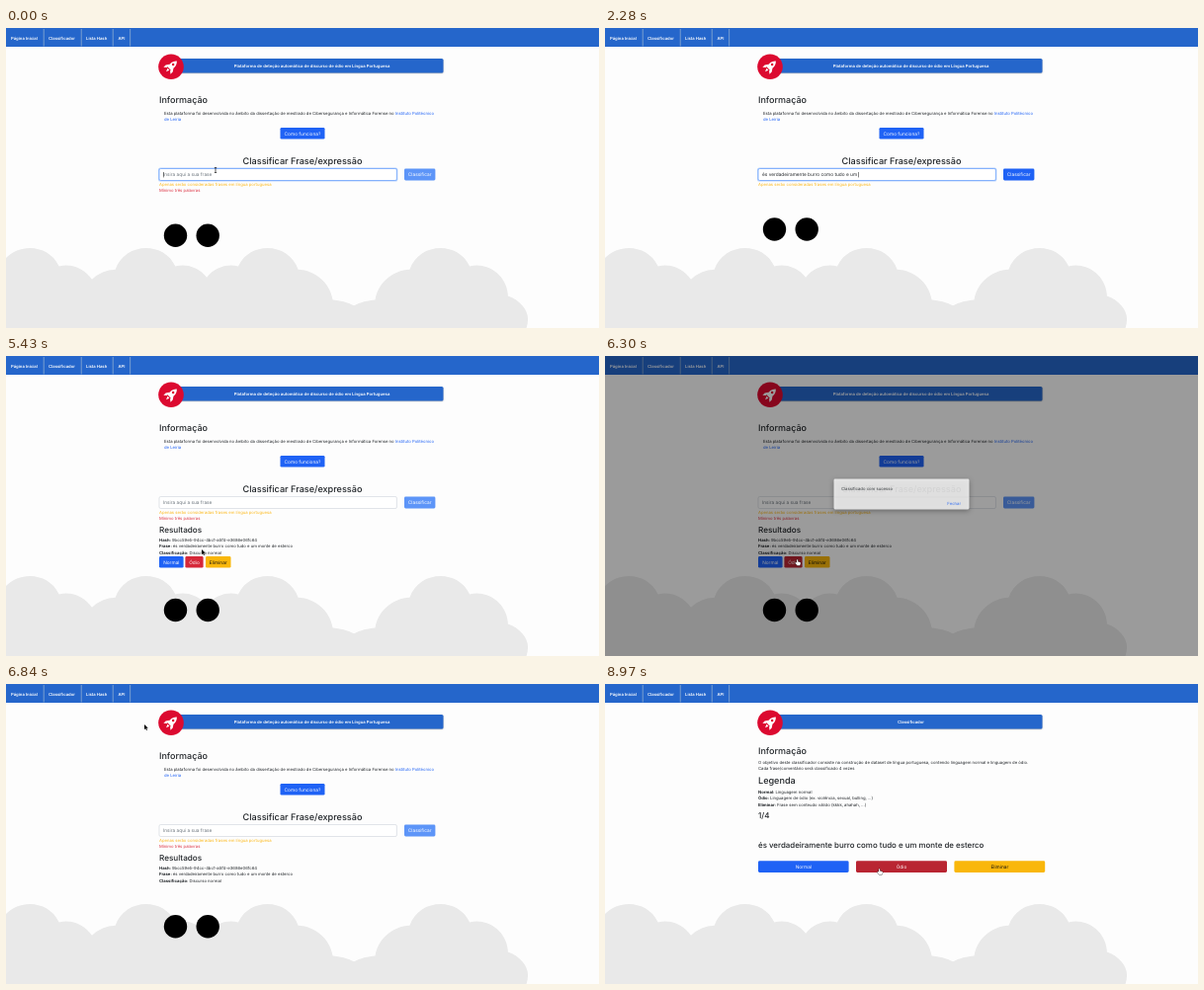
These frames come from a looping animation (600 px wide and 304 px high, 9 s). An HTML page with a canvas:

```html
<!DOCTYPE html>
<html lang="pt">
<head>
<meta charset="utf-8">
<style>
html, body { margin: 0; width: 100%; height: 100%; overflow: hidden; background: #fdfdfd; }
canvas { display: block; width: 600px; height: 304px; }
</style>
</head>
<body>
<canvas id="stage"></canvas>
<script>
const W = 600, H = 304, LOOP = 9000;
const canvas = document.getElementById('stage');
const ctx = canvas.getContext('2d');
const dpr = window.devicePixelRatio || 1;
canvas.width = W * dpr;
canvas.height = H * dpr;

const INK = '#212529', BLUE = '#1f62f5', BAR = '#2566cb', RED = '#d62839',
  DARK_RED = '#b92532', YELLOW = '#f9b70b', PALE_BLUE = '#5d95f8';
const HEAD = 9.1, SUBHEAD = 8, BODY = 4.77, SMALL = 4.23;
const PHRASE = 'és verdadeiramente burro como tudo e um monte de esterco';

// Moments of the story, in ms
const T = {
  type: 210, pointer: 3000, send: 3330, result: 4890, press: 6215,
  close: 6600, cleared: 6690, page: 7680, loaded: 8370
};

const TYPING = [[210, 1], [1100, 20], [2270, 40], [2920, PHRASE.length]];
const POINTER = [
  [0, 212, 144], [3020, 212, 144], [3180, 450, 152], [3260, 432, 150],
  [4960, 432, 150], [5430, 198, 196], [5720, 195, 209], [6380, 195, 209],
  [6540, 353, 149], [6640, 353, 149], [6840, 140, 41], [7250, 56, 12],
  [8190, 54, 11], [8400, 54, 11], [8780, 296, 203], [8930, 278, 190], [9000, 278, 190]
];
const HAND_TIMES = [[3220, 4990], [5650, 6400], [6510, 6660], [7180, 8440], [8850, 9000]];

const clamp = v => Math.max(0, Math.min(1, v));
const smooth = u => u * u * (3 - 2 * u);

function along(keys, t, ease = u => u) {
  let i = 1;
  while (i < keys.length - 1 && keys[i][0] <= t) i++;
  const [a, b] = [keys[i - 1], keys[i]];
  const u = ease(clamp((t - a[0]) / (b[0] - a[0])));
  return a.slice(1).map((v, k) => v + (b[k + 1] - v) * u);
}

function setFont(size, weight) {
  ctx.font = `${weight} ${size}px Inter, sans-serif`;
}

function text(str, x, y, { size = SMALL, weight = 400, color = INK, align = 'left' } = {}) {
  setFont(size, weight);
  ctx.fillStyle = color;
  ctx.textAlign = align;
  ctx.fillText(str, x, y);
  return ctx.measureText(str).width;
}

function labelled(label, str, x, y) {
  const w = text(label + ' ', x, y, { weight: 700 });
  text(str, x + w, y);
}

function box(x, y, w, h, r, fill) {
  ctx.beginPath();
  ctx.roundRect(x, y, w, h, r);
  ctx.fillStyle = fill;
  ctx.fill();
}

function disc(x, y, r, fill) {
  ctx.beginPath();
  ctx.arc(x, y, r, 0, Math.PI * 2);
  ctx.fillStyle = fill;
  ctx.fill();
}

function button(label, x, y, w, h, fill, color = '#fff') {
  box(x, y, w, h, 1.4, fill);
  text(label, x + w / 2, y + h / 2 + 1.75, { size: BODY, color, align: 'center' });
}

const cloudPath = new Path2D(
  'M2379.7 229c10-93-77-171-168-149-52-114-225-105-264 15-75 3-140 59-152 133' +
  '-30 3-67 10-93.5 26-27-16-63.5-23-93.5-26-12-74-77-130-152-133-39-120-212-129-264-15' +
  '-54-13-107 9-138.5 49-32-40-84-62-138.5-49-52-114-225-105-264 15' +
  'a162 162 0 0 0-103 43c-31-45-87-72-145-58-52-114-225-105-264 15-75 3-140 59-152 133' +
  '-53 5-127 23-130 83-2 42 35 72 70 86H2435c20-20 32-50 33-80 3-43-34-87-88-106z');

function clouds() {
  ctx.save();
  ctx.translate(-71.9, 223);
  ctx.scale(0.2298, 0.2298);
  ctx.translate(142.7, 0);
  ctx.fillStyle = '#e9e9e9';
  ctx.fill(cloudPath);
  ctx.restore();
}

function rocket(x, y) {
  ctx.save();
  ctx.translate(x, y);
  ctx.rotate(Math.PI / 4);
  ctx.fillStyle = '#fff';
  ctx.fill(new Path2D('M0-8.2C3-5.6 3.4-2 2.4 2.6H-2.4C-3.4-2-3-5.6 0-8.2z' +
    'M2.9-.6L5 2.6V5.8L2.3 3.6zM-2.9-.6L-5 2.6V5.8L-2.3 3.6zM-1.3 3.6H1.3L0 7z'));
  ctx.restore();
  disc(x + 2.1, y - 2.1, 1.25, '#dc0a30');
}

function frame(title) {
  ctx.fillStyle = '#fdfdfd';
  ctx.fillRect(0, 0, W, H);
  clouds();
  ctx.fillStyle = BAR;
  ctx.fillRect(0, 0, W, 19);
  const links = [['Página Inicial', 5], ['Classificador', 43], ['Lista Hash', 81], ['API', 113.5]];
  for (const [name, x] of links) text(name, x, 11.5, { weight: 600, color: '#fff' });
  ctx.fillStyle = 'rgba(235,235,215,.6)';
  for (const x of [37.8, 75.8, 107.8, 125.4]) ctx.fillRect(x, 1, 0.7, 17.5);

  ctx.save();
  ctx.shadowColor = 'rgba(0,0,0,.3)';
  ctx.shadowBlur = 1.5 * dpr;
  ctx.shadowOffsetY = 0.4 * dpr;
  box(167, 31, 275.5, 14.6, 1.6, BAR);
  ctx.restore();
  disc(167, 39.2, 12.8, '#dc0a30');
  rocket(167, 39.2);
  text(title, 309.5, 39.9, { weight: 600, color: '#fff', align: 'center' });
}

function inputField(t, typed, focused) {
  if (focused) box(154, 141.4, 242.4, 14.2, 2.2, '#b9d3fd');
  box(155, 142.5, 240.4, 12, 1.5, '#fff');
  ctx.lineWidth = focused ? 0.8 : 0.5;
  ctx.strokeStyle = focused ? '#6ea4fb' : '#c3c9d2';
  ctx.stroke();
  const empty = !typed;
  const w = text(empty ? 'Insira aqui a sua frase' : typed, 159, 150.3,
    { size: BODY, color: empty ? '#6c757d' : INK });
  if (focused) {
    ctx.fillStyle = '#111';
    ctx.fillRect(159 + (empty ? 0 : w), 146, 0.5, 5.4);
  }
}

function spinner(t) {
  const start = Math.PI * 0.85 + (t - 3540) / 750 * Math.PI * 2;
  ctx.beginPath();
  ctx.arc(408, 148, 4.5, start, start + Math.PI * 1.5);
  ctx.lineWidth = 1.25;
  ctx.strokeStyle = INK;
  ctx.stroke();
}

function results(t) {
  text('Resultados', 155, 178.6, { size: 8.15, weight: 500 });
  labelled('Hash:', '9bcc59e5-94cc-4bc1-a5f4-e3686e06fc64', 155, 187.7);
  labelled('Frase:', PHRASE, 155, 194.2);
  labelled('Classificação:', 'Discurso normal', 155, 200.7);
  if (t >= T.cleared) return;
  const hover = t > 5650 && t < 6400;
  button('Normal', 155, 203, 24.6, 11.6, BLUE);
  button('Ódio', 181.4, 203, 18.2, 11.6, hover ? DARK_RED : RED);
  button('Eliminar', 202, 203, 25.5, 11.6, YELLOW, '#111');
}

function homePage(t) {
  const waiting = t >= T.send && t < T.result;
  const done = t >= T.result;
  const count = t < T.type || done ? 0 : Math.floor(along(TYPING, t)[0]);
  const tooShort = count < 20;

  frame('Plataforma de deteção automática de discurso de ódio em Língua Portuguesa');
  text('Informação', 155, 75.9, { size: 9, weight: 500 });
  const w = text('Esta plataforma foi desenvolvida no âmbito da dissertação de mestrado de ' +
    'Cibersegurança e Informática Forense no ', 160, 88);
  text('Instituto Politécnico', 160 + w, 88, { color: BLUE });
  text('de Leiria', 160, 94.4, { color: BLUE });
  button('Como funciona?', 277.5, 100.9, 45, 11.7, BLUE);

  text('Classificar Frase/expressão', 300, 137.9, { size: HEAD, weight: 500, align: 'center' });
  inputField(t, PHRASE.slice(0, count), t < T.send);
  if (waiting) spinner(t);
  else button('Classificar', 403, 142.6, 31.4, 11.8, tooShort ? PALE_BLUE : BLUE);

  text('Apenas serão consideradas frases em língua portuguesa', 155, 159.6, { color: '#fcb91c' });
  if (waiting) text('Aguarde, pode demorar até 5 segundos para obter a sua classificação.', 155, 166);
  else if (tooShort) text('Mínimo três palavras', 155, 166, { color: '#dc3545' });
  if (done) results(t);

  let iconY = tooShort || waiting ? 210.3 : 204;
  if (done) iconY = t < T.cleared ? 257.5 : 245.8;
  for (const x of [171.5, 204.2]) disc(x, iconY, 11.7, '#000');
}

function classifierPage(t) {
  frame('Classificador');
  text('Informação', 155, 71.1, { size: 9, weight: 500 });
  text('O objetivo deste classificador consiste na construção de dataset de língua portuguesa, ' +
    'contendo linguagem normal e linguagem de ódio.', 155, 80.8);
  text('Cada frase/comentário será classificado 4 vezes', 155, 87.2);
  text('Legenda', 155, 101.1, { size: HEAD, weight: 500 });
  labelled('Normal:', 'Linguagem normal', 155, 110.7);
  labelled('Ódio:', 'Linguagem de ódio (ex. violência, sexual, bulling, ...)', 155, 117.1);
  labelled('Eliminar:', 'Frase sem conteudo válido (kkkk, ahahah, ...)', 155, 123.6);
  if (t < T.loaded) return;
  text('1/4', 155, 136.4, { size: SUBHEAD, weight: 500 });
  text(PHRASE, 155, 166.3, { size: 7.9, weight: 500 });
  button('Normal', 155, 179.3, 91.6, 11.7, BLUE);
  button('Ódio', 254, 179.3, 92, 11.7, t > 8750 ? DARK_RED : RED);
  button('Eliminar', 353.4, 179.3, 91.8, 11.7, YELLOW, '#111');
}

function dialog(t) {
  const shown = Math.min(clamp((t - T.press) / 100), clamp((T.cleared - t) / (T.cleared - T.close)));
  if (!shown) return;
  ctx.fillStyle = `rgba(0,0,0,${0.45 * shown})`;
  ctx.fillRect(0, 0, W, H);
  ctx.save();
  ctx.globalAlpha = shown;
  ctx.shadowColor = 'rgba(0,0,0,.4)';
  ctx.shadowBlur = 5 * dpr;
  ctx.shadowOffsetY = 1.5 * dpr;
  box(231.5, 124.5, 137, 31, 1.4, '#f4f4f4');
  ctx.shadowColor = 'transparent';
  ctx.fillStyle = '#d2d2d2';
  ctx.fillRect(231.5, 142.8, 137, 0.5);
  text('Classificado com sucesso', 239, 136);
  text('Fechar', 360, 150.8, { color: BLUE, align: 'right' });
  ctx.restore();
}

const shapes = {
  arrow: new Path2D('M0 0V5.2L1.2 4.1 2.1 6 3 5.6 2.1 3.8H3.8z'),
  hand: new Path2D('M-.9-2.4Q-.3-3.2.2-2.4V-.6L2.4 0Q3.1.4 2.8 1.4L2.2 3.2H-.7L-2.4.8Q-2.5 0-1.7.1L-.9.7z')
};

function pointer(t) {
  if (t >= T.type && t < T.pointer) return;
  const [x, y] = along(POINTER, t, smooth);
  ctx.save();
  ctx.translate(x, y);
  if (t < T.type) {
    ctx.fillStyle = '#111';
    ctx.fillRect(-0.35, -2.8, 0.7, 5.6);
    ctx.fillRect(-1.2, -2.9, 2.4, 0.6);
    ctx.fillRect(-1.2, 2.3, 2.4, 0.6);
  } else {
    const hand = HAND_TIMES.some(([a, b]) => t >= a && t < b);
    const shape = hand ? shapes.hand : shapes.arrow;
    ctx.lineWidth = hand ? 0.7 : 0.8;
    ctx.strokeStyle = hand ? '#111' : '#fff';
    ctx.fillStyle = hand ? '#fff' : '#000';
    ctx.stroke(shape);
    ctx.fill(shape);
  }
  ctx.restore();
}

function draw(t) {
  ctx.setTransform(dpr, 0, 0, dpr, 0, 0);
  ctx.textRendering = 'geometricPrecision';
  if (t < T.page) homePage(t);
  else classifierPage(t);
  dialog(t);
  pointer(t);
}

const begin = performance.now();
function tick() {
  draw((performance.now() - begin) % LOOP);
  requestAnimationFrame(tick);
}
tick();
</script>
</body>
</html>
```
